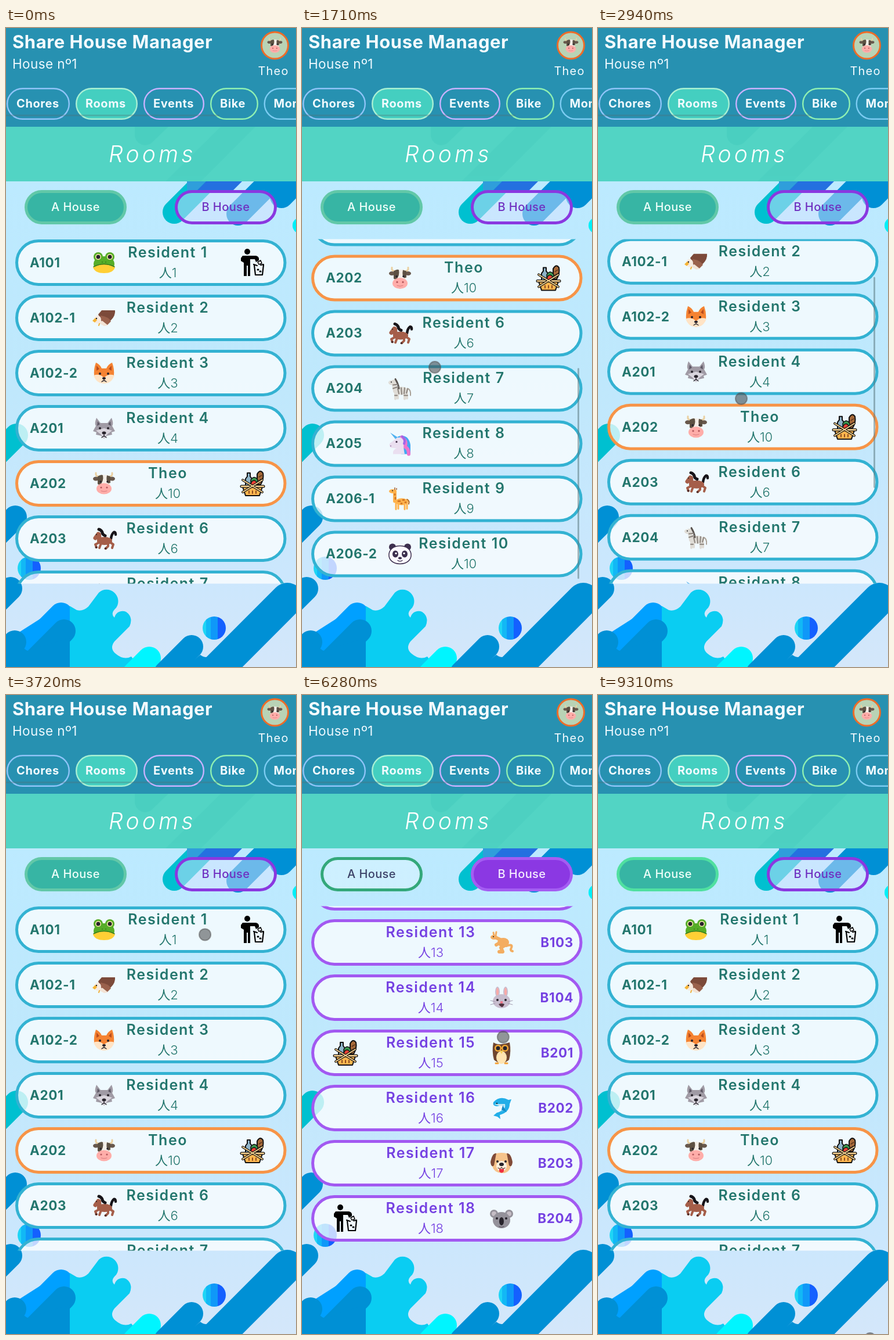
Write an HTML page that moves like this. It is 500 px wide and 1100 px high and loops after 9370 ms.

```html
<!DOCTYPE html>
<html lang="en">
<head>
<meta charset="utf-8">
<title>Share House Manager</title>
<style>
html, body { margin: 0; width: 100%; height: 100%; overflow: hidden; background: #c4e9fd; }
svg { display: block; width: 100%; height: 100%; font-family: Inter, "Noto Sans CJK JP", "Noto Sans CJK", sans-serif; }
</style>
</head>
<body>
<svg id="stage" viewBox="0 0 500 1100"></svg>
<script>
const LOOP = 9370, ROW = 95, TOP = 364, VIEW = 594;

// Shape helpers returning SVG markup
const C = (x, y, r, f) => `<circle cx="${x}" cy="${y}" r="${r}" fill="${f}"/>`;
const E = (x, y, rx, ry, f) => `<ellipse cx="${x}" cy="${y}" rx="${rx}" ry="${ry}" fill="${f}"/>`;
const P = (d, f) => `<path d="${d}" fill="${f}"/>`;
const L = (d, s, w, f = 'none') => `<path d="${d}" fill="${f}" stroke="${s}" stroke-width="${w}" stroke-linecap="round" stroke-linejoin="round"/>`;
const T = (x, y, str, size, weight, fill, gap = 0, anchor = 'start', more = '') =>
  `<text x="${x}" y="${y}" font-size="${size}" font-weight="${weight}" fill="${fill}" letter-spacing="${gap}" text-anchor="${anchor}" ${more}>${str}</text>`;
const pill = (x, y, w, h, f, s, b, more = '') =>
  `<rect x="${x + b / 2}" y="${y + b / 2}" width="${w - b}" height="${h - b}" rx="${(h - b) / 2}" fill="${f}" stroke="${s}" stroke-width="${b}" ${more}/>`;
const at = (x, y, body, k = 1) => `<g transform="translate(${x} ${y}) scale(${k})">${body}</g>`;
const pair = (x, y, r, f = '#27232b') => C(-x, y, r, f) + C(x, y, r, f);
const whiskers = L('M-19 5L-11 7M-19 12L-11 10M19 5L11 7M19 12L11 10', '#a39db0', 1);

// Four-legged animal facing left
const beast = (f, neck, legs) =>
  L('M-8 4L' + neck, f, 8) + E(1, 4, 13, 7, f) + L(legs, f, 4);

const horseLegs = 'M-9 7L-15 10L-13 15M-5 8L-8 16M10 6L16 10L14 16M7 8L7 13L3 17';
const straightLegs = 'M-8 7V18M-4 8V17M8 7V18M12 6V17';

const art = {
  frog: pair(10, -10, 8, '#56ad28') + E(0, 2, 18, 13, '#56ad28') +
    P('M-19 8Q0-2 19 8Q16 18 0 18T-19 8Z', '#ffcf35') + pair(10, -10, 5, '#fff2b0') + pair(10, -10, 3.5) +
    L('M-18 7Q0-2 18 7', '#367b1d', 1.5) + pair(3, -1, 1, '#367b1d'),
  eagle: P('M-10-6L-4-13H19Q20-4 12 4L4 10L-6 4Z', '#7c4a3a') + P('M-6-4Q8-2 12 6L6 12L-4 10Z', '#9a614c') +
    P('M-3 5L7 13L0 14L-9 9Z', '#f3e3d5') + E(-11, 3, 6, 7, '#f7eadf') + P('M-15 0L-20 5L-16 8L-12 4Z', '#f5b335') +
    C(-13, 1, 1.2, '#222') + L('M-8 10L-9 13', '#f0ad35', 2),
  fox: P('M-14-18Q-7-15-4-8H4Q7-15 14-18Q18-7 17 4L0 18L-17 4Q-18-7-14-18Z', '#f58332') +
    P('M-18 4Q-8 0 0 8Q8 0 18 4Q13 18 0 18T-18 4Z', '#ffe4c6') + P('M-13-13L-8-7L-13-4ZM13-13L8-7L13-4Z', '#b94d1d') +
    pair(7, 1, 2) + E(0, 9, 3, 2, '#27232b') + L('M0 11V13M-4 15Q0 11 4 15', '#27232b', 1.2),
  wolf: P('M-13-18L-6-9H6L13-18Q17-8 14-4L19 5L13 7L14 11L5 13L0 18L-5 13L-14 11L-13 7L-19 5L-14-4Q-17-8-13-18Z', '#a09ba5') +
    P('M-11-12L-7-7L-12-4ZM11-12L7-7L12-4Z', '#5d5865') + P('M-14 4L0 0L14 4L6 10L0 18L-6 10Z', '#d9d5dd') +
    pair(7, 0, 2) + E(0, 8, 3.5, 2.5, '#27232b') + L('M0 10V14M-4 16L0 13L4 16', '#27232b', 1.3),
  cow: L('M-9-12Q-15-12-14-18M9-12Q15-12 14-18', '#ead0a0', 3) + E(-14, -8, 5, 3.5, '#68584c') + E(14, -8, 5, 3.5, '#68584c') +
    P('M-11-12Q0-18 11-12L10 8H-10Z', '#f3eee7') + P('M-11-12Q-5-16-2-14Q0-4-7 3L-11 1ZM11-12L5-14Q3-5 7 0L11-1Z', '#5d5143') +
    pair(6, -3, 1.8) + E(0, 9, 13, 9.5, '#ffada9') + pair(5, 7, 1.6, '#b5595d') + L('M-5 13Q0 15 5 13', '#d87b7d', 1),
  horse: L('M12 0Q13-8 17-11Q20-12 20-7', '#171419', 4.5) + beast('#a55e49', '-9-7', horseLegs) +
    L('M-10-8L-15-1', '#a55e49', 7) + L('M-9-16Q-5-15-3-11Q-3-7 2-5', '#171419', 5) + C(-13, -7, 1, '#222') + L('M-13 15H-14M3 17H2', '#4a2825', 3),
  zebra: L('M13 0Q19 2 18 12', '#aaa197', 2) + beast('#dfdcd6', '-11-11', straightLegs) + E(-14, -10, 6, 4, '#dfdcd6') +
    L('M-8-16Q-3-8-2 0', '#58524e', 3) + L('M-12-6L-4-7M-12 0L-3-3M-4 0L-2 9M2-1L3 10M8-1L7 9M13 1L11 8M-9 12H-5M7 12H13', '#8b847e', 2) + C(-15, -11, 1, '#222'),
  unicorn: P('M-4-12Q14-18 18 2V18H2L-4-4Z', '#43a8f3') + L('M3-11Q13-3 8 5Q15 8 15 18', '#ee73ce', 6) +
    P('M-5-10Q4-13 7-2Q5 5 8 18H-12Q-13 11-6 8L-16 7Q-20 3-17-1Z', '#eadff0') + P('M-8-8L-17-19L-4-11Z', '#51b2ef') +
    C(-6, -3, 1.6, '#403048') + C(-16, 4, 1, '#9a77a5') + L('M4-12Q10-8 7 0', '#a067e8', 4),
  giraffe: L('M12 1Q17 4 15 9', '#b76c25', 2) + L('M-9 4V-13', '#ffb24b', 6) + E(-13, -13, 6, 3.5, '#ffb24b') + E(3, 5, 11, 6, '#ffb24b') +
    L('M-7 6V18M-3 6V17M8 6V18M12 5V17', '#ffb24b', 3) + L('M-9-16V-19M-6-16V-18', '#a45c2a', 1.5) +
    L('M-9-8V-7M-8-2V0M-3 4H0M5 2H7M9 6H10M2 8H3', '#d17726', 3) + C(-13, -14, 1, '#222'),
  panda: pair(13, -12, 6, '#3d2f4e') + L('M0-14C25-14 26 17 0 17S-25-14 0-14Z', '#3d2f4e', 1.5, '#fbf8ff') +
    E(-8, 0, 5, 6, '#3d2f4e') + E(8, 0, 5, 6, '#3d2f4e') + pair(7, -1, 1.6, '#fff') + E(0, 7, 3, 2, '#3d2f4e') + L('M-4 11Q0 14 4 11', '#3d2f4e', 1.3),
  hedgehog: P('M-12 3L-11-7L-7-8L-5-13L0-11L4-15L8-10L13-10L14-5L19-2L17 4L19 8L14 13H-8Z', '#654034') +
    P('M-8-2Q-15 0-19 7Q-19 11-10 13H11L15 10Q3 4-8-2Z', '#f2ad69') + C(-18, 7, 2, '#2b2023') + C(-12, 4, 1.6, '#2b2023') +
    L('M-9 13V15M9 13V15', '#d38b50', 4) + L('M-3-5H-2M3-8H4M9-4H10M4 0H5M12 3H13', '#a37657', 2),
  mouse: pair(12, -8, 8, '#c7bdca') + pair(12, -8, 6, '#ff9c96') + P('M-13-2Q0-13 13-2Q15 9 4 16H-4Q-15 9-13-2Z', '#c7bdca') +
    pair(6, 2, 2) + E(0, 9, 3, 2, '#ef7b83') + whiskers + L('M-2 14H2', '#fff', 2),
  kangaroo: L('M8 6Q20 2 17 9Q14 14 19 15', '#f3ad61', 4) + E(3, 0, 10, 8, '#f3ad61') + L('M2-3L-9-8M-2 0L-9 4M6 5L-1 9L2 16H-4', '#f3ad61', 6) +
    E(-13, -9, 6, 4, '#f3ad61') + L('M-10-12L-9-18M-13-12L-14-17', '#f3ad61', 3) + C(-14, -10, 1, '#222'),
  rabbit: E(-7, -10, 4, 9, '#c8bdce') + E(7, -10, 4, 9, '#c8bdce') + E(-7, -10, 2, 7, '#ffaaa7') + E(7, -10, 2, 7, '#ffaaa7') +
    E(0, 6, 15, 12, '#c8bdce') + pair(7, 4, 2) + E(0, 8, 2.5, 2, '#ed7587') + P('M-5 11Q0 9 5 11Q3 17 0 16T-5 11Z', '#52323e') + whiskers,
  owl: L('M-10 18H-6M6 18H10', '#f6a233', 3) + P('M-14-18Q-8-14 0-15T14-18Q17-3 13 12Q0 23-13 12Q-17-3-14-18Z', '#70462f') +
    E(0, 8, 9, 11, '#ffe4b1') + pair(6, -8, 6, '#f4a936') + pair(6, -8, 3.5) + P('M-3-4H3L0 2Z', '#f7cf58'),
  dolphin: P('M-14-10Q-3-22 12-14L17-15L14-7Q14 7-3 12L-2 19L-7 15L-14 13L-8 8Q5 5 2-5L-8-3Q-16-4-14-10Z', '#22aee8') +
    P('M-13-7Q-4-2 3-5Q5 2-1 7Q8 1 6-7Z', '#bde8f7') + C(-8, -8, 1.3, '#20303a') + P('M2-4L9 7L0 3Z', '#168ac4'),
  dog: P('M-12-16Q0-20 12-16L16 5Q13 18 0 17T-16 5Z', '#f6c38b') + P('M-9-17Q-16-18-19-2Q-18 8-13 4ZM9-17Q16-18 19-2Q18 8 13 4Z', '#804b38') +
    E(0, 5, 9, 9, '#fff0df') + pair(7, -3, 2) + E(0, 2, 4, 3, '#27232b') + L('M-6 8Q-2 11 0 7Q2 11 6 8', '#5b3a35', 1.2) + P('M-4 10H4V14Q0 19-4 14Z', '#ee3041'),
  koala: pair(13, -8, 7, '#94919a') + pair(13, -8, 4, '#c5bdc5') + E(0, 3, 15, 14, '#94919a') + pair(8, 0, 2) + E(0, 5, 4, 7, '#27232b') + L('M-4 14Q0 16 4 14', '#554f59', 1.2),
  bin: C(-9, -19, 5, '#000') + P('M-17-12H6Q12-11 11-4L6-1L4-6H-4V23H-8V5H-10V23H-15V0L-20-3V-8Z', '#000') +
    L('M3 4L5 21H17L19 4M2 3L8 5M19 3L14 4', '#000', 2.2) + L('M9-1L14-4L16 1L11 3Z', '#000', 1.5, '#fff') + L('M9 12H10M13 15H14', '#000', 3),
  basket: L('M-12 4V-8L-9-12V-18H-4V-12L-1-8V4Z', '#111', 2, '#8fb4c9') + L('M8 2V-16Q13-25 18-18Q20-8 14 2Z', '#111', 2, '#a76a39') +
    L('M11-11L16-14M11-5L16-8', '#5e371e', 1.5) + L('M-3-6Q3-15 9-6V2H-3Z', '#111', 1.5, '#3c9950') + L('M-3 2Q-2-6 4-5Q10-1 6 4Z', '#111', 1.5, '#ee4235') +
    L('M-17 6H17L12 21H-12Z', '#111', 2, '#ffb64f') + L('M-6 13V17M0 13V17M6 13V17', '#8b4b20', 2) +
    L('M-19 5H19', '#111', 5) + L('M-19 5H19', '#ffd894', 2.4) +
    L('M-17-6L17 15M17-6L-17 15', '#111', 4) + L('M-17-6L17 15M17-6L-17 15', '#ffd894', 1.8)
};

const houses = {
  A: {
    codes: 'A101 A102-1 A102-2 A201 A202 A203 A204 A205 A206-1 A206-2', first: 1,
    pets: 'frog eagle fox wolf cow horse zebra unicorn giraffe panda', icons: { 0: 'bin', 4: 'basket' },
    line: '#33b2d2', ink: '#23766d', codeX: 41, anchor: 'start', nameX: 279, petX: 169, iconX: 425, max: 358
  },
  B: {
    codes: 'B101 B102 B103 B104 B201 B202 B203 B204', first: 11,
    pets: 'hedgehog mouse kangaroo rabbit owl dolphin dog koala', icons: { 4: 'basket', 7: 'bin' },
    line: '#a259f1', ink: '#7541e2', codeX: 468, anchor: 'end', nameX: 222, petX: 344, iconX: 75, max: 168
  }
};

function list(key) {
  const h = houses[key], pets = h.pets.split(' ');
  const rows = h.codes.split(' ').map((code, i) => {
    const y = TOP + i * ROW, me = code === 'A202', n = h.first + i;
    return pill(16, y, 467.5, 80, '#fff', me ? '#f79447' : h.line, 5, 'fill-opacity=".74"') +
      T(h.codeX, y + 48, code, 22.5, 700, h.ink, .6, h.anchor) +
      T(h.nameX, y + 31, me ? 'Theo' : 'Resident ' + n, 25, 600, h.ink, 1.5, 'middle') +
      T(h.nameX, y + 65, '人' + (me ? 10 : n), 22, 300, h.ink, 0, 'middle') +
      at(h.petX, y + 40, art[pets[i]]) +
      (h.icons[i] ? at(h.iconX, y + 40, art[h.icons[i]]) : '');
  });
  return `<g id="list${key}">${rows.join('')}</g>`;
}

const dark = '#0090d5', teal = '#00c0d0';
const backdrop =
  '<rect width="500" height="1100" fill="url(#sky)"/>' +
  L('M290 317L355 252', teal, 40) +
  P('M312 264H345L329 280H312Z', '#2f9edb') + P('M345 264H407L391 280H329Z', '#2470e0') +
  L('M400 320L470 250M475 290L520 245', dark, 40) + C(508, 340, 14, '#00f0f8') +
  L('M18 701L-20 739', teal, 40) + L('M16 842L-25 883M8 965L-25 998', dark, 40) +
  C(40, 930, 20, 'url(#ball)') + C(359, 1033, 20, 'url(#ball)') +
  L('M95 1009L0 1104', '#00a0ff', 40) + P('M15 1045L70 1010H110V1100H0Z', '#00a0ff') +
  P('M110 995L122 1002Q132 1005 142 996L160 972A20 20 0 0 1 190 998Q179 1008 187 1015C190 1004 200 1002 207 1005Q220 1014 213 1030L187 1056Q178 1068 189 1077Q203 1089 216 1082L230 1100H110Z', '#0acdf2') +
  L('M247 1085L222 1110', '#00f5ff', 40) + P('M204 1100L233 1071L247 1100Z', '#00f5ff') +
  L('M100 1038L28 1110M15 1057L-20 1092', dark, 40) + P('M0 1045L35 1071Q44 1076 54 1066L110 1050V1100H0Z', dark) +
  L('M485 983L350 1118', dark, 56) + L('M320 1065L275 1110', dark, 40) + P('M335 1079Q345 1087 355 1079V1100H310Z', dark);

const chip = (x, w, label, line, fill = 'none') => pill(x, 103, w, 55, fill, line, 2.4) + T(x + 17, 137, label, 20, 700, '#f2fbff', .6);
const header =
  '<rect y="170" width="500" height="94" fill="#52d4c4"/>' +
  '<g opacity=".14">' + P('M275 264L370 170H430L336 264Z', '#33bfb5') + P('M222 170V184A18 18 0 0 0 254 195L280 170Z', '#1fb3aa') + '</g>' +
  T(177, 231, 'Rooms', 39, 300, '#fff', 5.2, 'start', 'font-style="italic"') +
  '<rect width="500" height="170" fill="#2791b1"/>' +
  T(11, 35, 'Share House Manager', 31, 700, '#f4fbff', .55) + T(11, 70, 'House nº1', 22.5, 400, '#eef9ff', .4) +
  '<circle cx="463.5" cy="30" r="23" fill="#b9d3b5" stroke="#ee6c28" stroke-width="3"/>' + at(463.5, 30, art.cow, .68) +
  T(461, 81, 'Theo', 20, 400, '#f4fbff', 1.2, 'middle') +
  chip(1, 109, 'Chores', '#8fc4f8') + chip(120, 107, 'Rooms', '#a8f0d4', '#44cfc0') + chip(237, 105, 'Events', '#c9b2ff') +
  chip(352, 83, 'Bike', '#8ff0b2') + chip(444.5, 110, 'Money', '#7cccf2') +
  '<rect y="149" width="368" height="3" fill="#556f70" opacity=".3"/>';

const button = (key, x) => `<g id="btn${key}">${pill(x, 279, 176, 59, 'none', '#000', 5)}${T(x + 88, 315, key + ' House', 20, 500, '#fff', .4, 'middle')}</g>`;

const stops = list => list.map(([o, c]) => `<stop offset="${o}" stop-color="${c}"/>`).join('');
const stage = document.getElementById('stage');
stage.innerHTML = `<defs>
  <linearGradient id="sky" x2="0" y2="1">${stops([[.24, '#bceaff'], [.55, '#bfe8fc'], [.85, '#cbe7fd'], [1, '#d4e7fa']])}</linearGradient>
  <linearGradient id="ball">${stops([[.16, '#1fd5f5'], [.16, '#12b8f5'], [.36, '#12b8f5'], [.36, '#0f98f8'], [.65, '#0f98f8'], [.65, '#1460ff']])}</linearGradient>
  <clipPath id="view"><rect y="363.5" width="500" height="593"/></clipPath></defs>
  ${backdrop}${header}${button('A', 32)}${button('B', 291)}
  <g clip-path="url(#view)">${list('A')}${list('B')}</g>
  <rect id="thumb" x="475" width="3" rx="1.5" fill="#5f7f86"/>
  <circle id="cursor" r="10" fill="#444" fill-opacity=".55" stroke="#555" stroke-opacity=".55" stroke-width="2"/>`;
const $ = id => document.getElementById(id);

// Pointer path: time, x, y, and 1 where the approach is linear
const path = [
  [200, 512, 1115], [930, 232, 570], [1160, 232, 570], [1710, 229, 584], [2030, 228, 590], [2300, 247, 638],
  [3250, 247, 638], [3980, 382, 321], [4720, 382, 321], [5170, 329, 583], [5640, 344, 579], [6230, 344, 579],
  [6440, 363, 645], [6590, 363, 645], [6710, 383, 657], [7560, 383, 657], [7900, 140, 318], [8080, 140, 318],
  [8490, 452, 892, 1], [8520, 489, 947, 1], [8550, 540, 1010, 1], [8780, 520, 1090, 1], [8820, 492, 1089],
  [8870, 515, 1115], [9309, 515, 1115], [9310, 469, 1108, 1], [9370, 469, 1108]
];
const clamp = v => Math.min(1, Math.max(0, v));
const easeOut = (t, start, span) => 1 - (1 - clamp((t - start) / span)) ** 2;

function pointer(t) {
  const i = path.findIndex(p => p[0] > t);
  if (i < 1) return path[0].slice(1);
  const [t0, x0, y0] = path[i - 1], [t1, x1, y1, linear] = path[i];
  let k = (t - t0) / (t1 - t0);
  if (!linear) k = k * k * (3 - 2 * k);
  return [x0 + (x1 - x0) * k, y0 + (y1 - y0) * k];
}

// Scrollbar visibility: shown, fading from, gone
const shows = [[1160, 2030, 2300], [2650, 3400, 3700], [5480, 5900, 6200], [7140, 7560, 7800]];
const thumbAlpha = t => Math.max(...shows.map(([a, b, c]) => t < a ? 0 : Math.min((t - a) / 80, clamp((c - t) / (c - b)))));

function paint(key, fill, alpha, line, ink) {
  const [box, label] = $('btn' + key).children;
  box.setAttribute('fill', fill);
  box.setAttribute('fill-opacity', alpha);
  box.setAttribute('stroke', line);
  label.setAttribute('fill', ink);
}

function draw(t) {
  const inB = t >= 4330 && t < 8000, key = inB ? 'B' : 'A', { max } = houses[key];
  const scroll = max * (inB ? easeOut(t, 5480, 300) - easeOut(t, 7140, 200) : easeOut(t, 1160, 620) - easeOut(t, 2650, 608));
  for (const k of 'AB') $('list' + k).style.display = k === key ? '' : 'none';
  $('list' + key).setAttribute('transform', `translate(0 ${-scroll})`);

  if (inB) {
    paint('A', '#fff', .25, '#33a87a', '#3c4268');
    paint('B', '#8b38e3', 1, '#a45df2', '#f6eeff');
  } else {
    paint('A', '#37b5a4', 1, t < 4330 ? '#62c8a8' : '#50e0a0', '#effffa');
    paint('B', '#d8e4ff', .5, '#8a38e0', '#6f2fc0');
  }

  const ratio = 582 / (VIEW + max), thumb = $('thumb');
  thumb.setAttribute('y', 369 + scroll * ratio);
  thumb.setAttribute('height', VIEW * ratio);
  thumb.setAttribute('opacity', .55 * thumbAlpha(t));

  const [x, y] = pointer(t);
  $('cursor').setAttribute('transform', `translate(${x} ${y})`);
}

const begin = performance.now();
(function tick() {
  draw((performance.now() - begin) % LOOP);
  requestAnimationFrame(tick);
})();
</script>
</body>
</html>
```
